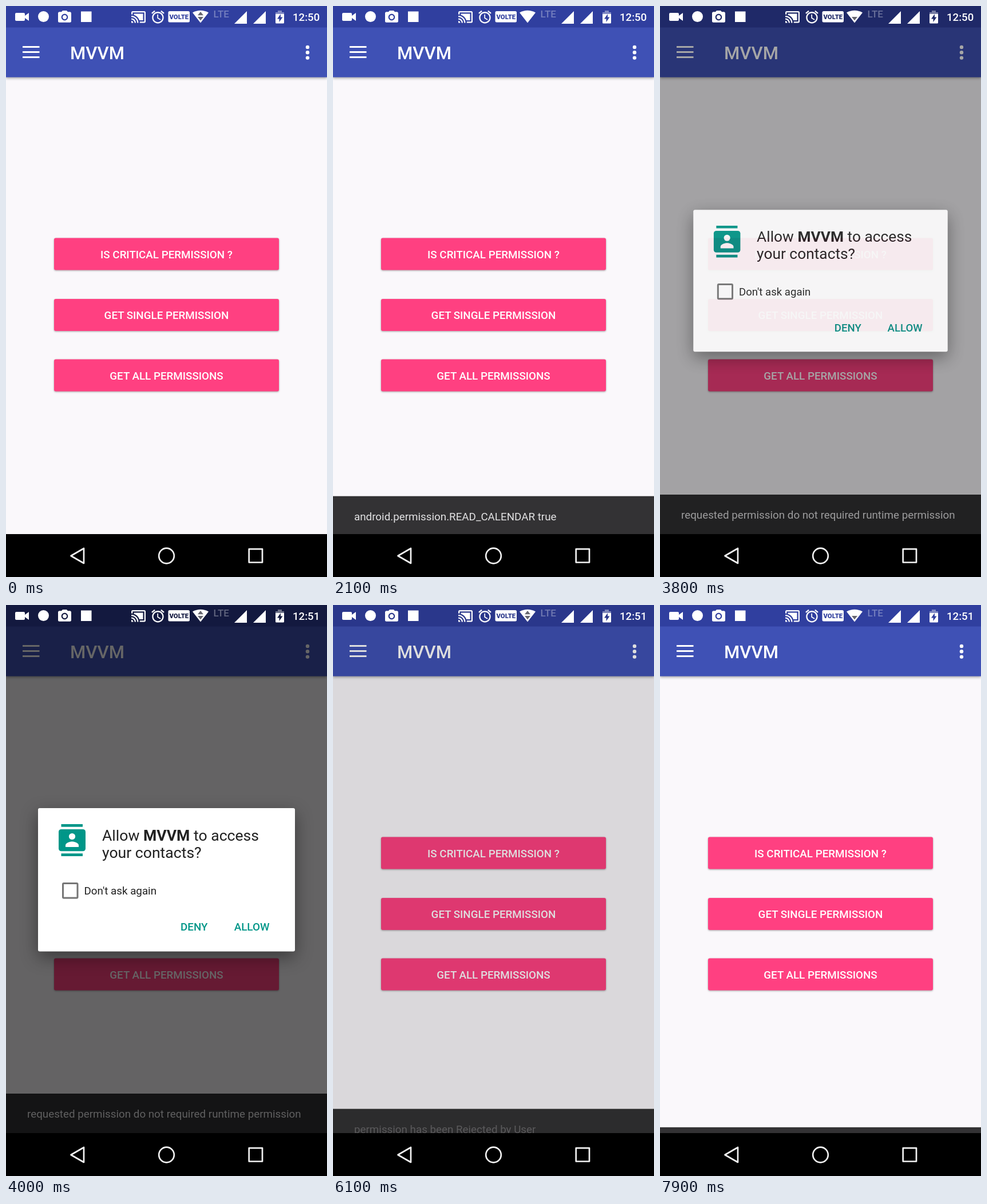
Animation, 561 px wide and 998 px high, one loop 8000 ms. Source, as an HTML page:

```html
<!DOCTYPE html>
<html lang="en">
<head>
<meta charset="utf-8">
<title>Permission demo</title>
<style>
  html, body { margin: 0; width: 100%; height: 100%; overflow: hidden; background: #000; }
  svg { display: block; width: 100vw; height: 100vh; font: 18.8px Roboto, sans-serif; }
  .med { font-weight: 500; }
  .mid { text-anchor: middle; }
  .btn rect { filter: drop-shadow(0 1.5px 1.5px rgba(0, 0, 0, .35)); }
  .bar { filter: drop-shadow(0 2px 2px rgba(0, 0, 0, .32)); }
  .card { filter: drop-shadow(0 10px 15px rgba(0, 0, 0, .42)); }
  .nav { fill: none; stroke: #f2f2f2; stroke-width: 2.7; stroke-linejoin: round; }
</style>
</head>
<body>
<svg viewBox="0 0 561 998" preserveAspectRatio="none">
  <rect width="561" height="998" fill="#faf8fb"/>

  <g id="buttons"></g>
  <clipPath id="clip"><rect id="clipBox" x="84" width="393" height="56" rx="3"/></clipPath>
  <g id="ripple" clip-path="url(#clip)">
    <rect id="tint" x="84" y="400" width="393" height="280" fill="#701848"/>
    <circle id="wave" fill="#701848"/>
  </g>
  <g id="labels" fill="#fff" class="med mid"></g>

  <rect class="bar" y="30" width="561" height="94.5" fill="#3f51b5"/>
  <rect width="561" height="37.5" fill="#303f9f"/>
  <g fill="#fff">
    <path d="M29 71.5H58.5M29 80.5H58.5M29 89.5H58.5" stroke="#fff" stroke-width="2.8"/>
    <text class="med" x="112" y="93" font-size="31.2">MVVM</text>
    <circle cx="527" cy="72" r="3.2"/>
    <circle cx="527" cy="81.3" r="3.2"/>
    <circle cx="527" cy="90.6" r="3.2"/>
  </g>

  <g id="snack">
    <rect width="561" height="70" fill="#333234"/>
    <text id="message" x="37" y="42.3" fill="#efeff0"></text>
  </g>

  <rect id="dim" width="561" height="923"/>

  <g fill="#fff">
    <path d="M18 12h13q2 0 2 2v3l7-5v14l-7-5v3q0 2-2 2H18q-2 0-2-2V14q0-2 2-2z"/>
    <circle cx="65.5" cy="18.5" r="9.5"/>
    <path transform="translate(88.7 5.7) scale(1.15)" d="M9 2L7.17 4H4c-1.1 0-2 .9-2 2v12c0 1.1.9 2 2 2h16c1.1 0 2-.9 2-2V6c0-1.1-.9-2-2-2h-3.17L15 2H9zm3 15c-2.76 0-5-2.24-5-5s2.24-5 5-5 5 2.24 5 5-2.24 5-5 5zm0-8.2a3.2 3.2 0 1 0 .01 0z"/>
    <rect x="131" y="9.5" width="18.5" height="18.5"/>
    <path transform="translate(217.9 5.6) scale(1.136)" d="M1 18v3h3c0-1.66-1.34-3-3-3zm0-4v2c2.76 0 5 2.24 5 5h2c0-3.87-3.13-7-7-7zm0-4v2c4.97 0 9 4.03 9 9h2c0-6.08-4.93-11-11-11zM19 7H5v1.63c3.96 1.28 7.09 4.41 8.37 8.37H19V7zM21 3H3c-1.1 0-2 .9-2 2v3h2V5h18v14h-7v2h7c1.1 0 2-.9 2-2V5c0-1.1-.9-2-2-2z"/>
    <path transform="translate(251.9 5.6) scale(1.13)" d="M22 5.72l-4.6-3.86-1.29 1.53 4.6 3.86L22 5.72zM7.88 3.39L6.6 1.86 2 5.71l1.29 1.53 4.59-3.85zM12.5 8H11v6l4.75 2.85.75-1.23-4-2.37V8zM12 4c-4.97 0-9 4.03-9 9s4.02 9 9 9 9-4.03 9-9-4.03-9-9-9zm0 16c-3.87 0-7-3.13-7-7s3.13-7 7-7 7 3.13 7 7-3.13 7-7 7z"/>
    <rect x="283.5" y="9" width="37.5" height="19.5" rx="2.5"/>
    <text id="volte" class="mid" x="302.3" y="22.7" font-size="11.3" font-weight="900">VOLTE</text>
    <path d="M340 29.5L326 11.5Q340 4 354 11.5z"/>
    <path id="up" d="M335 16.3l5-6.3 5 6.3z" fill="#66666f"/>
    <path id="down" d="M335 19h10l-5 6.3z" fill="#66666f"/>
    <text class="med" x="362.5" y="20.3" font-size="17" opacity=".33">LTE</text>
    <path d="M421 9v22H399zM454 9v22H432z"/>
    <path d="M475 8h7v3h4v4h-15v-4h4z" opacity=".4"/>
    <path fill-rule="evenodd" d="M471 14h15v15q0 1.5-1.5 1.5h-12q-1.5 0-1.5-1.5zM480 14l-6 8.5h3.5V28l6-8.5H480z"/>
    <text id="clock" class="med" x="501" y="26" font-size="18.6"></text>
  </g>

  <g id="dialog">
    <rect class="card" x="56" y="355" width="449" height="250.5" rx="3" fill="#fff"/>
    <g fill="#009688">
      <path d="M96.500 383h37.500v4.700H96.500zM96.500 434.300h37.500v4.700H96.500z"/>
      <rect x="92" y="392" width="47" height="38.3" rx="4.500"/>
      <g fill="#fff">
        <circle cx="115.500" cy="404.500" r="5.600"/>
        <path d="M104 423v-3c0-4 7-6.500 11.500-6.500s11.500 2.500 11.500 6.500v3z"/>
      </g>
      <rect id="press" x="296" y="545" width="68" height="36" rx="3" fill="#000" opacity=".12"/>
      <text class="med" x="305" y="569.4">DENY</text>
      <text class="med" x="398.700" y="569.4">ALLOW</text>
    </g>
    <g fill="#212121">
      <text x="168" y="411.5" font-size="26.6">Allow <tspan font-weight="700">MVVM</tspan> to access</text>
      <text x="168" y="442" font-size="26.6">your contacts?</text>
      <text x="136.500" y="506.2">Don't ask again</text>
    </g>
    <rect x="99.500" y="486.500" width="25.500" height="25.500" rx="1.500" fill="none" stroke="#757575" stroke-width="3"/>
  </g>

  <rect y="923" width="561" height="75"/>
  <g class="nav">
    <path d="M136 948v26L113.500 961z"/>
    <circle cx="280.500" cy="961" r="13.300"/>
    <rect x="424.700" y="949.200" width="23.300" height="23.300"/>
  </g>
</svg>
<script>
const LOOP = 8000, STEP = 100, FLOOR = 923, SNACK_H = 69;
const $ = id => document.getElementById(id);
const set = (id, attrs) => {
  for (const key in attrs) $(id).setAttribute(key, attrs[key]);
};
const clamp = v => Math.min(1, Math.max(0, v));

const buttons = [
  [405.5, 'IS CRITICAL PERMISSION ?'],
  [512, 'GET SINGLE PERMISSION'],
  [617.5, 'GET ALL PERMISSIONS']
];
$('buttons').innerHTML = buttons.map(([y]) =>
  `<g class="btn"><rect x="84" y="${y}" width="393" height="56" rx="3" fill="#ff4081"/></g>`).join('');
$('labels').innerHTML = buttons.map(([y, label]) =>
  `<text x="280.5" y="${y + 35.2}">${label}</text>`).join('');

const snacks = [
  { show: 295, hide: 2070, text: 'android.permission.READ_CALENDAR true' },
  { show: 3195, hide: 4970, text: 'requested permission do not required runtime permission' },
  { show: 6000, hide: 7757, text: 'permission has been Rejected by User' }
];
const taps = [{ at: 100, row: 0, x: 320 }, { at: 3100, row: 1, x: 340 }];
const dimKeys = [[3600, 0], [3700, .12], [3800, .35], [3900, .54], [4000, .6],
  [5900, .6], [6000, .38], [6100, .13], [6200, 0]];
const dialogKeys = [[3600, 0], [3700, .35], [3800, .9], [3900, 1], [5900, 1], [6000, .4], [6100, 0]];
// wifi arrows: [from, up, down]
const traffic = [[0, 1, 1], [900, 0, 0], [2900, 0, 1], [3900, 1, 1], [7800, 0, 1]];

function lerpKeys(keys, t) {
  if (t <= keys[0][0]) return keys[0][1];
  for (let i = 1; i < keys.length; i++) {
    const [t0, a] = keys[i - 1], [t1, b] = keys[i];
    if (t <= t1) return a + (b - a) * (t - t0) / (t1 - t0);
  }
  return keys[keys.length - 1][1];
}

// cubic-bezier(.4, 0, .2, 1)
function ease(x) {
  let lo = 0, hi = 1;
  for (let i = 0; i < 24; i++) {
    const s = (lo + hi) / 2, r = 1 - s;
    if (1.2 * r * r * s + .6 * r * s * s + s ** 3 < x) lo = s; else hi = s;
  }
  return lo * lo * (3 - 2 * lo);
}

function drawSnack(t) {
  const bar = snacks.find(s => t >= s.show && t < s.hide + 250);
  set('snack', { visibility: bar ? 'visible' : 'hidden' });
  if (!bar) return;
  const leaving = clamp((t - bar.hide) / 250);
  const shown = leaving ? 1 - ease(leaving) : ease(clamp((t - bar.show) / 250));
  const fade = clamp((t - bar.hide) / 180);
  const alpha = clamp((t - bar.show) / 360) * (1 + Math.cos(Math.PI * fade)) / 2;
  set('snack', { transform: `translate(0 ${FLOOR - SNACK_H * shown})` });
  set('message', { opacity: alpha });
  $('message').textContent = bar.text;
}

function drawRipple(t) {
  const tap = taps.find(p => t >= p.at && t < p.at + 600);
  set('ripple', { visibility: tap ? 'visible' : 'hidden' });
  if (!tap) return;
  const age = t - tap.at, y = buttons[tap.row][0];
  set('clipBox', { y });
  set('ripple', { opacity: clamp((600 - age) / 200) });
  set('tint', { opacity: .07 * clamp((age + 50) / 200) });
  set('wave', { cx: tap.x, cy: y + 28, r: 20 + age * .327, opacity: .07 });
}

function draw(t) {
  const dim = lerpKeys(dimKeys, t), alpha = lerpKeys(dialogKeys, t);
  const scale = t < 4000 ? .9 + .1 * alpha : 1;
  drawRipple(t);
  drawSnack(t);
  set('dim', { opacity: dim });
  set('dialog', {
    opacity: alpha,
    visibility: alpha ? 'visible' : 'hidden',
    transform: `translate(280.5 480) scale(${scale}) translate(-280.5 -480)`
  });
  set('press', { opacity: t >= 5900 ? .12 : 0 });
  set('volte', { fill: `rgb(${[48, 63, 159].map(c => Math.round(c * (1 - dim)))})` });
  const [, up, down] = traffic.filter(k => k[0] <= t).pop();
  set('up', { opacity: up });
  set('down', { opacity: down });
  $('clock').textContent = t < 4000 ? '12:50' : '12:51';
}

const start = performance.now();
function tick() {
  const t = (performance.now() - start) % LOOP;
  draw(Math.floor(t / STEP) * STEP);
  requestAnimationFrame(tick);
}
tick();
</script>
</body>
</html>
```
